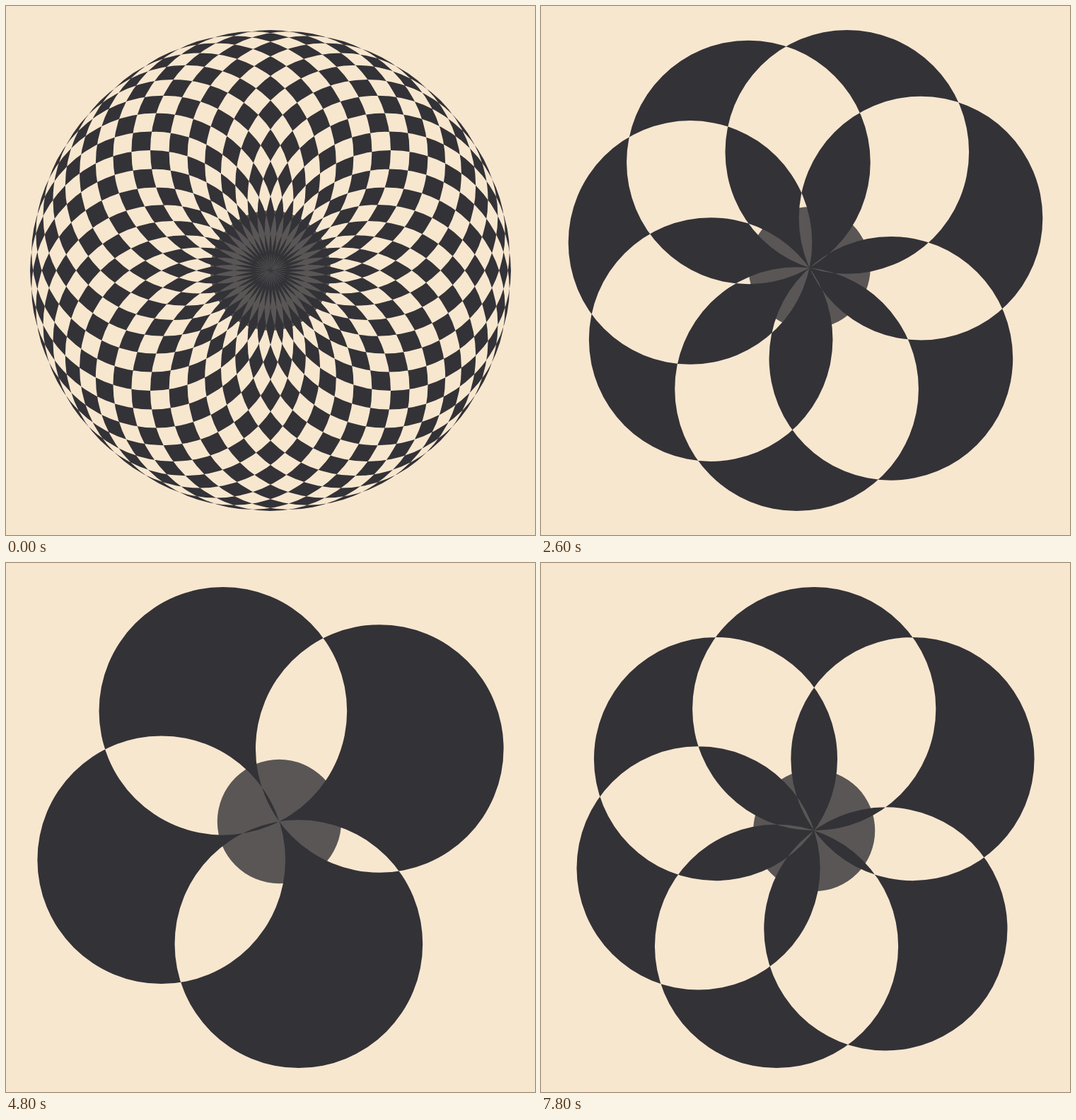
An HTML page that plays this animation: 748x748 px, repeating every 8000 ms.

```html
<!DOCTYPE html>
<html lang="en">
<head>
<meta charset="utf-8">
<title>Rosette of circles</title>
<style>
  html, body { margin: 0; width: 100%; height: 100%; overflow: hidden; background: #f8e7cf; }
  svg { display: block; width: 100vw; height: 100vh; fill: #333237; }
</style>
</head>
<body>
<svg viewBox="0 0 748 748">
  <path id="petals" fill-rule="evenodd"/>
  <circle id="hub" fill-opacity=".8"/>
</svg>
<script>
const STAGE = 748, EXTENT = 680;
const TICK = 200, TICKS = 40, PEAK = 27;
const petals = document.getElementById('petals');
const hub = document.getElementById('hub');

// Angle between neighbouring circles: widens to 90 degrees, then narrows again.
const spacing = tick => 90 - 3 * Math.abs(PEAK - tick);

const circlePath = (x, y, r) =>
  `M${x - r} ${y}a${r} ${r} 0 1 1 ${2 * r} 0a${r} ${r} 0 1 1 ${-2 * r} 0z`;

function range(values) {
  const min = Math.min(...values), max = Math.max(...values);
  return { size: max - min + 2, middle: (min + max) / 2 };
}

function draw(tick) {
  const step = spacing(tick);
  const centres = [];
  for (let angle = step; angle <= 360; angle += step) {
    const a = angle * Math.PI / 180;
    centres.push([Math.cos(a), Math.sin(a)]);
  }

  // Fit the bounding box of all circles into the middle of the stage.
  const xs = range(centres.map(c => c[0]));
  const ys = range(centres.map(c => c[1]));
  const r = EXTENT / Math.max(xs.size, ys.size);
  const cx = STAGE / 2 - xs.middle * r;
  const cy = STAGE / 2 - ys.middle * r;

  petals.setAttribute('d', centres.map(([x, y]) => circlePath(cx + x * r, cy + y * r, r)).join(''));
  hub.setAttribute('cx', cx);
  hub.setAttribute('cy', cy);
  hub.setAttribute('r', r / 2);
}

const start = performance.now();
let shown = -1;

function play(now) {
  const tick = Math.floor(Math.max(0, now - start) / TICK) % TICKS;
  if (tick !== shown) draw(shown = tick);
  requestAnimationFrame(play);
}
play(start);
</script>
</body>
</html>
```
